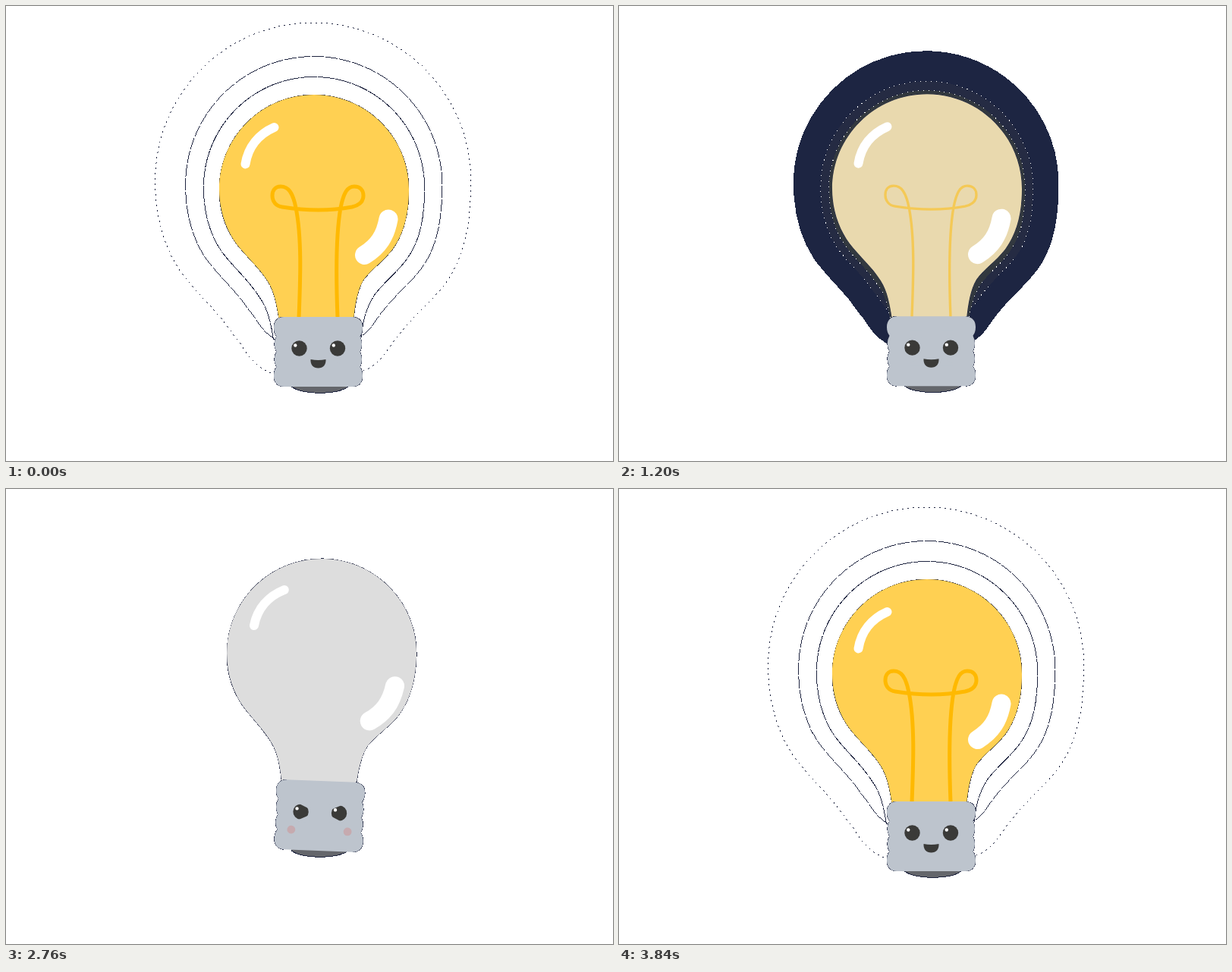
An HTML page that plays this animation: 800 by 600 pixels, repeating every 3.88 s.

```html
<!DOCTYPE html>
<html lang="en">
<head>
<meta charset="utf-8">
<title>Light bulb</title>
<style>
  html, body { margin: 0; width: 100%; height: 100%; overflow: hidden; background: #fff; }
  svg { display: block; width: 100vw; height: 100vh; }
  .line { fill: none; stroke: #1f2540; stroke-width: 1; shape-rendering: crispEdges; }
  .ring { vector-effect: non-scaling-stroke; stroke-width: 1; shape-rendering: crispEdges; }
  .shine { fill: none; stroke: #fff; stroke-linecap: round; }
  .dark { fill: #3a3a38; }
  .cap { fill: #bdc4cd; }
</style>
</head>
<body>
<svg viewBox="0 0 800 600">
  <g id="body">
    <path d="M376 498V501.5C388 513.3 440 513.3 451 501.5V498Z" fill="#64666b"/>
    <path class="line" d="M376 501.5C388 513.3 440 513.3 451 501.5"/>
    <g id="tilt">
      <path id="outer" class="ring"/>
      <path id="mid" class="ring"/>
      <path id="inner" class="ring"/>
      <path id="edge" class="line"/>
      <path id="glass"/>
      <path id="wire" fill="none" d="M386 411C388 360 390 305 382 266C378 246 372 238 362 238C354 238 351 244 351 250C351 258 356 264 364 265C395 270 429 270 456 265C465 263 471 258 471 250C471 243 467 238 459 238C450 238 445 246 441 266C434 305 435 360 437 411"/>
      <path class="shine" stroke-width="12" d="M315.5 208.5C319 186 333 169 353.5 160"/>
      <path class="shine" stroke-width="25" d="M504 281C500 303 491 317 472.5 328.5"/>
      <path id="sides" class="line"/>
      <path id="cap" class="cap"/>
      <g class="dark">
        <circle cx="386.5" cy="451.5" r="10.2"/>
        <circle cx="437" cy="451.5" r="10.2"/>
        <path id="mouth" d="M401.5 466Q411.5 468 421.5 466C422 473 418 477.5 411.5 477.5C405 477.5 401 473 401.5 466Z"/>
      </g>
      <g id="lids" class="cap">
        <path class="top"/><path class="low"/>
        <g transform="matrix(-1 0 0 1 823.5 0)"><path class="top"/><path class="low"/></g>
      </g>
      <g fill="#fff">
        <circle cx="381.3" cy="447.5" r="2.2"/>
        <circle cx="431.8" cy="447.5" r="2.2"/>
      </g>
      <g id="cheeks" fill="#c6aaaf">
        <circle cx="374.7" cy="475.5" r="5.4"/>
        <circle cx="449" cy="475.5" r="5.4"/>
      </g>
    </g>
  </g>
</svg>
<script>
const LOOP = 3880, STEP = 40;
const $ = id => document.getElementById(id);
const all = sel => document.querySelectorAll(sel);
const set = (el, attrs) => { for (const k in attrs) el.setAttribute(k, attrs[k]); };
const smooth = (t, a, b) => {
  const x = Math.min(1, Math.max(0, (t - a) / (b - a)));
  return x * x * (3 - 2 * x);
};

// Interpolates between [time, value] pairs
function track(keys, t, eased) {
  let i = 1;
  while (i < keys.length - 1 && t > keys[i][0]) i++;
  const [t0, v0] = keys[i - 1], [t1, v1] = keys[i];
  const x = Math.min(1, Math.max(0, (t - t0) / (t1 - t0)));
  return v0 + (v1 - v0) * (eased ? smooth(x, 0, 1) : x);
}

// Lit state: switches off from `off`, comes back from `on`
const lit = (t, off, on) => 1 - smooth(t, off, off + 640) + smooth(t, on, on + 620);

const dome = "281 242C281 173 337 117 406 117C475 117 531 173 531 242";
const bulb = `M360 414C357 395 354 377 345 363C333 344 318 332 304 314C290 295 281 270 ${dome}` +
  "C531 275 524 301 509 321.5C497 337 480.5 348 471 361.5C463.5 374 460 393 458 414Z";
// Glow outlines have slightly fuller flanks than the glass
const flanks = `342.5 364C331 346 316 334 302 315.5C288 296 281 270 ${dome}` +
  "C531 277 526 303 510.5 324C500 338 486 349 475 363";
const rim = `M360 414C357 395 354 379 ${flanks}C465 378 461 393 459 414Z`;
const halo = `M406 396H376C364 392 357 384 352 377Q348 370 ${flanks}C464 375 460 391 440 394Z`;
const right = "C466 411 470 416 470 424Q470 431 466.5 435.5Q471.5 446 466.5 456Q471.5 466 466.5 476Q470 481 470 488C470 496 465 502 457 502";
const left = "C358 502 353 496 353 488Q353 481 356.5 476Q351 466 356.5 456Q351 446 356.5 435.5Q353 431 353 424C353 416 358 410 366 410";

set($("glass"), { d: bulb });
set($("edge"), { d: bulb });
set($("cap"), { d: `M366 410H457${right}H366${left}Z` });
set($("sides"), { d: `M457 410${right}M366 502${left}` });
all(".top").forEach(p => set(p, { d: "M383 440.5L399 448V438H383Z" }));
all(".low").forEach(p => set(p, { d: "M383 462.5L399 455V465H383Z" }));

const rings = [
  { el: $("outer"), d: halo, x: 404.7, size: 0.664, off: 923, on: 2960, fill: "#1d2542", dash: "2 5" },
  { el: $("mid"), d: halo, x: 405.7, size: 0.353, off: 810, on: 2970, fill: "#252b43", dash: "16 2" },
  { el: $("inner"), d: rim, x: 406, size: 0.165, off: 750, on: 2920, fill: "#32383f", dash: "22 1" }
];
rings.forEach(r => set(r.el, { d: r.d }));

// Phase of the float in degrees
const sway = [[0, 56.6], [480, 149], [1000, 266.5], [1120, 288], [1560, 360], [1720, 384],
  [2240, 486], [2760, 602], [3280, 694], [3840, 770.7], [3880, 776.6]];
const lean = [[2240, 0], [2420, -1.8], [2660, 3.5], [2760, 2.2], [3220, -1.8], [3280, -1.37], [3400, 0]];

const mix = (a, b, k) => `rgb(${a.map((v, i) => Math.round(v + (b[i] - v) * k))})`;

function draw(t) {
  const y = -13.5 + 24.5 * Math.cos(track(sway, t) * Math.PI / 180);
  set($("body"), { transform: `translate(0 ${y.toFixed(2)})` });
  set($("tilt"), { transform: `rotate(${track(lean, t, true).toFixed(3)} 411.5 505)` });

  for (const r of rings) {
    const p = lit(t, r.off, r.on), full = p > 0.93;
    set(r.el, {
      transform: `translate(${r.x} 260) scale(${1 + r.size * p}) translate(-406 -260)`,
      visibility: p > 0.02 ? "visible" : "hidden",
      fill: full ? "none" : r.fill,
      stroke: full ? "#1f2540" : r.size > 0.5 ? "none" : "#fff",
      "stroke-dasharray": full ? r.dash : "1 6"
    });
  }

  const glow = lit(t, 810, 2945);
  set($("glass"), { fill: mix([221, 221, 221], [255, 208, 82], glow) });
  set($("wire"), {
    stroke: "#ffb900",
    "stroke-width": 2.5 + 2.5 * glow,
    opacity: 1 - smooth(t, 1000, 1400) + smooth(t, 3180, 3480)
  });

  const cross = smooth(t, 2040, 2280) - smooth(t, 3400, 3600);
  const open = 9 * (1 - cross);
  set($("mouth"), { transform: `translate(411.5 471) scale(${1 - cross}) translate(-411.5 -471)` });
  set($("cheeks"), { opacity: cross });
  all(".top").forEach(p => set(p, { transform: `translate(0 ${-open})` }));
  all(".low").forEach(p => set(p, { transform: `translate(0 ${open})` }));
}

const start = performance.now();
function tick() {
  const t = (performance.now() - start) % LOOP;
  draw(Math.floor(t / STEP) * STEP);
  requestAnimationFrame(tick);
}
draw(0);
requestAnimationFrame(tick);
</script>
</body>
</html>
```
